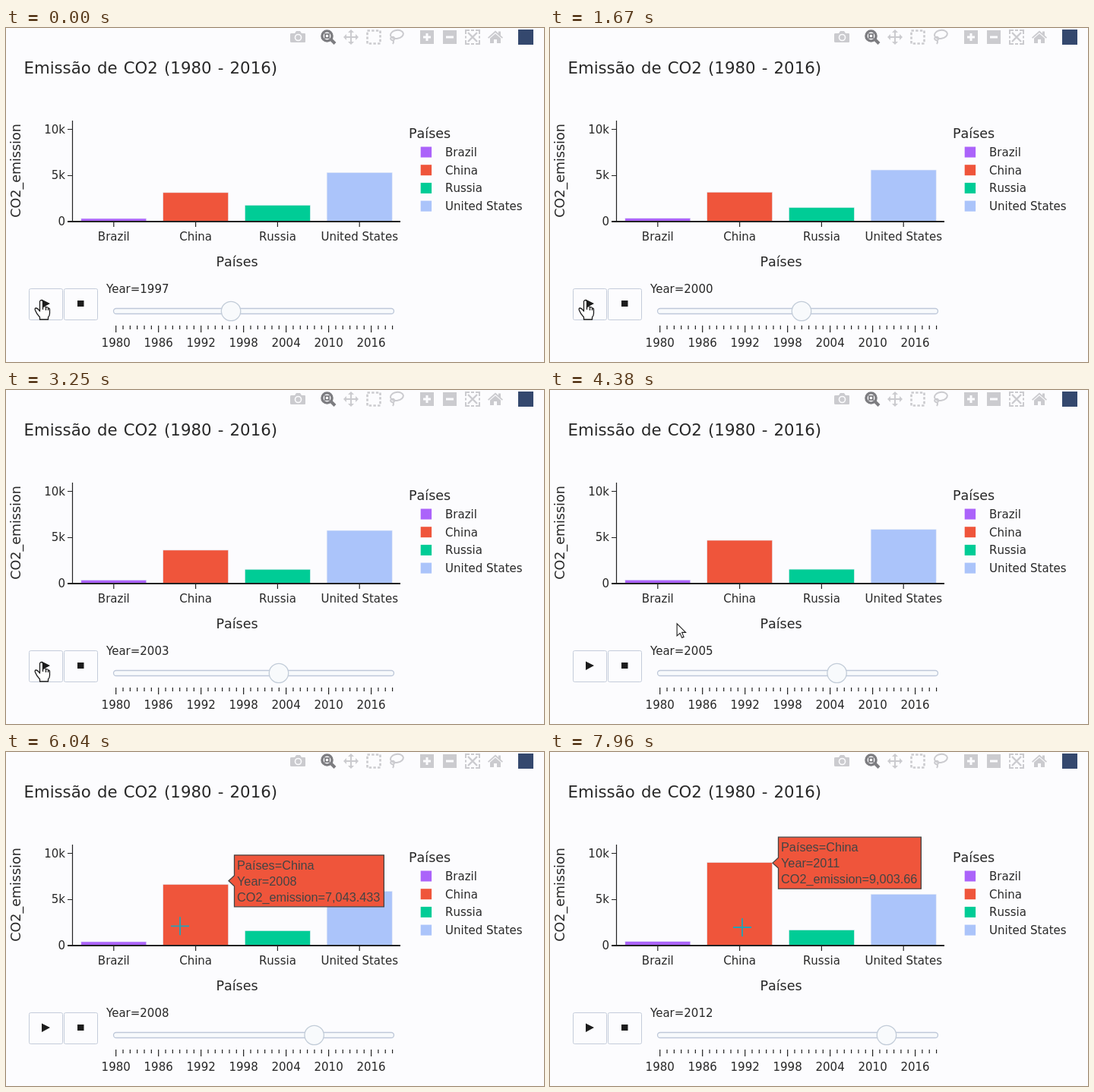
These frames come from a looping animation (708x440 px, 8000 ms). An HTML page:

```html
<!DOCTYPE html>
<html lang="pt">
<head>
<meta charset="utf-8">
<title>Emissão de CO2</title>
<style>
  html, body { margin: 0; width: 100%; height: 100%; overflow: hidden; background: #fcfcfe; }
  svg { display: block; }
  text { font: 15px "DejaVu Sans", sans-serif; font-kerning: none; fill: #282828; }
  .axis { font-size: 17.5px; }
  .title { font-size: 21.25px; word-spacing: .07em; }
  .mid { text-anchor: middle; }
  .end { text-anchor: end; }
  #year { font-kerning: normal; }
  #tip text { font: 16.25px "Liberation Sans", Arial, sans-serif; font-kerning: normal; fill: #444; }
  .line { fill: none; stroke: #222; }
  .button { fill: #fcfcfe; stroke: #c4ccda; }
  .icons { fill: #cbcbcf; }
  .icons .o { fill: none; stroke: #cbcbcf; }
  .icons .w { fill: none; stroke: #fcfcfe; stroke-width: 3; }
</style>
</head>
<body>
<svg width="708" height="440" viewBox="0 0 708 440">
  <g class="icons">
    <path d="M376 7h4l2-3h5l2 3h4q1 0 1 1v10q0 1-1 1h-17q-2 0-2-1v-10q0-1 2-1z"/>
    <circle cx="384.5" cy="12.5" r="4" class="w" style="stroke-width:1.6"/>
    <g fill="none" stroke="#7c7c80">
      <circle cx="422.5" cy="10.5" r="6.6" stroke-width="3.4"/>
      <path d="M428 15.5l5 5" stroke-width="4"/>
      <rect x="420" y="8" width="5" height="5" stroke-width="1.8"/>
    </g>
    <path class="o" stroke-width="2" d="M447 12h14M454 5v14"/>
    <path d="M444 12l4-4v8zM464 12l-4-4v8zM454 2l-4 4h8zM454 22l-4-4h8z"/>
    <rect class="o" x="475.5" y="3.5" width="17" height="17" stroke-width="2.6" stroke-dasharray="3.4 2.27"/>
    <g class="o" stroke-width="2">
      <ellipse cx="514.5" cy="8.5" rx="8.5" ry="5.5" transform="rotate(-10 514 9)"/>
      <path d="M507 12q-2 3 1 4t3-2t-3-2M509 16q2 2 0 5"/>
    </g>
    <path d="M545 3h18v18h-18zM575 3h18v18h-18z"/>
    <path class="w" d="M549 12h10M554 7v10M579 12h10"/>
    <path class="o" stroke-width="2.4" d="M608 6l12 12M620 6l-12 12"/>
    <path class="o" stroke-width="2" d="M605 8v-5h5M618 3h5v5M623 16v5h-5M610 21h-5v-5M612 3h4M612 21h4M605 10.5v3M623 10.5v3"/>
    <path d="M634 12.5L644 3.5l4 3.6V4.5h3v5.3l3 2.7-1.2 1.2L644 6l-8.8 7.7zM637 13.5l7-6 7 6v6.5h-5v-5h-4v5h-5z"/>
    <rect x="674" y="2" width="20" height="20" fill="#34486e"/>
  </g>

  <text class="title" x="23.5" y="60">Emissão de CO2 (1980 - 2016)</text>
  <text class="axis mid" transform="translate(19 188) rotate(-90)">CO2_emission</text>
  <text class="axis mid" x="304" y="314">Países</text>
  <text class="axis" x="530" y="145">Países</text>

  <g id="chart"></g>
  <path class="line" stroke-width="1.2" d="M87.5 122V255M81 194.5H87M81 133.5H87"/>
  <path class="line" stroke-width="2" d="M81 255H519"/>

  <g class="button">
    <rect x="30.5" y="343.5" width="44" height="41" rx="2"/>
    <rect x="76.5" y="343.5" width="44" height="41" rx="2"/>
  </g>
  <path fill="#1c1c1c" d="M47 357.5l11 5.500-11 6zM94 359h8.500v8h-8.500z"/>

  <text id="year" x="132" y="349"></text>
  <rect x="141.5" y="369.5" width="369" height="7" rx="3.5" fill="#f8fafc" stroke="#bec8d9" stroke-width="1.3"/>
  <g id="scale"></g>
  <circle id="handle" cy="373" r="12.7" fill="#f8fafc" stroke="#c2ccd8" stroke-width="1.3"/>

  <g id="tip">
    <path id="tipBox" fill="#ef553b" stroke="#444" stroke-width="1.3"/>
    <text x="304" y="-15">Países=China</text>
    <text id="tipYear" x="304" y="6"></text>
    <text id="tipValue" x="304" y="27"></text>
  </g>

  <g id="hand" fill="#fff" stroke="#1c1c1c" stroke-width="1.3" stroke-linejoin="round">
    <path d="M-2 1q2-3 4 0v8l1-1q2-1 3 1 2-1 3 1 2 0 2 2v5q0 3-2 5v3H-2v-3q-4-4-6-9-1-3 1-3t5 4z"/>
    <path fill="none" d="M2 8v4M6 9v4M9 10v3"/>
  </g>
  <path id="arrow" fill="#fff" stroke="#1c1c1c" stroke-width="1.1" d="M0 0V16L4 12.5 6.5 18.5 9 17.5 6.5 11.5H11.5z"/>
  <path id="cross" fill="none" stroke="#24a2b6" stroke-width="1.8" d="M-12 0H12M0-12V12"/>
</svg>

<script>
const LOOP = 8000, HOLD = 130, FIRST_YEAR = 1997;
const SLIDE = 150, GROW = 500, TIP_DELAY = 220;
const $ = id => document.getElementById(id);

// Key points of emission by year; values between them are interpolated.
const countries = [
  { name: "Brazil", fill: "#ab63fa", keys: [[1996, 275], [2011, 390]] },
  { name: "China", fill: "#ef553b", keys: [[1996, 3100], [1999, 3150], [2002, 3590], [2004, 4660],
    [2006, 6120.078], [2009, 7505.111], [2011, 9003.66]] },
  { name: "Russia", fill: "#00cc96", keys: [[1996, 1720], [1999, 1474], [2006, 1520], [2009, 1640]] },
  { name: "United States", fill: "#abc4fa", keys: [[1996, 5280], [1999, 5570], [2006, 5950], [2011, 5540]] }
];
const china = countries[1];

// Pointer: time, x, y.
const pointer = [[3800, 46.5, 359], [4380, 167, 308], [5000, 228, 232], [6960, 230, 227], [7960, 253, 231]];

const clamp = v => Math.max(0, Math.min(1, v));
const ease = v => v < .5 ? 4 * v ** 3 : 1 - 4 * (1 - v) ** 3;
const yOf = value => 254.3 - value * 60.4 / 5000;
const yearX = year => 144.4 + (year - 1980) * 9.33;

// A steady beat, held up a little while the pointer crosses the chart.
const startOf = k => 524 * k - 60 + 150 * Math.exp(-(((k - 9) / 2) ** 2));

function stepAt(t) {
  let k = -1;
  while (startOf(k + 1) <= t) k++;
  return k;
}

// Fractional year of a part that follows each step over the given span.
function yearAt(t, span) {
  const k = stepAt(t);
  return FIRST_YEAR - 1 + k + ease(clamp((t - startOf(k)) / span));
}

function interpolate(keys, at, column = 1) {
  const next = keys.findIndex(key => key[0] > at);
  if (next < 1) return keys.at(next)[column];
  const a = keys[next - 1], b = keys[next];
  return a[column] + (b[column] - a[column]) * (at - a[0]) / (b[0] - a[0]);
}

function add(parent, tag, attrs, text = "") {
  const node = document.createElementNS("http://www.w3.org/2000/svg", tag);
  for (const key in attrs) node.setAttribute(key, attrs[key]);
  node.textContent = text;
  return parent.appendChild(node);
}

const chart = $("chart"), scale = $("scale");
countries.forEach((country, i) => {
  const { name, fill } = country, x = 141.8 + i * 107.8, y = 163.5 + i * 23.7;
  add(chart, "text", { x, y: 280, class: "mid" }, name);
  add(chart, "path", { d: `M${x} 255v7`, class: "line", "stroke-width": 1.2 });
  add(chart, "rect", { x: 545.7, y: y - 7, width: 14.4, height: 14, fill });
  add(chart, "text", { x: 578, y: y + 5.3 }, name);
  country.bar = add(chart, "rect", { x: x - 43, width: 86, fill, stroke: "#e5ecf6", "stroke-width": .6 });
});
["0", "5k", "10k"].forEach((label, i) =>
  add(chart, "text", { x: 78, y: yOf(i * 5000) + 5.4, class: "end" }, label));

for (let year = 1980; year < 2020; year++) {
  const major = year % 6 === 0, x = yearX(year) + .3;
  add(scale, "path", { d: `M${x} 392v${major ? 9 : 5}`, class: "line", "stroke-width": 1.2 });
  if (major) add(scale, "text", { x, y: 420, class: "mid" }, year);
}

function drawPointer(t) {
  const x = interpolate(pointer, t, 1), y = interpolate(pointer, t, 2);
  const shape = x < 75 && y > 343 ? "hand" : x > 87 && y < 255 ? "cross" : "arrow";
  for (const id of ["hand", "arrow", "cross"]) $(id).style.display = id === shape ? "" : "none";
  $(shape).setAttribute("transform", `translate(${x} ${y})`);
  return shape;
}

function drawTip(t) {
  const year = FIRST_YEAR + stepAt(t), value = interpolate(china.keys, year);
  $("tipYear").textContent = "Year=" + year;
  $("tipValue").textContent = "CO2_emission=" + value.toLocaleString("en-US", { maximumFractionDigits: 3 });
  const right = 309 + $("tipValue").getComputedTextLength();
  $("tipBox").setAttribute("d", `M293 0L300.5-7V-34H${right}V34H300.5V7z`);
  $("tip").setAttribute("transform", `translate(0 ${yOf(value) + .6})`);
}

function draw(t) {
  const grown = yearAt(t - SLIDE, GROW);
  for (const { bar, keys } of countries) {
    const top = yOf(interpolate(keys, grown));
    bar.setAttribute("y", top);
    bar.setAttribute("height", 254.3 - top);
  }
  $("year").textContent = "Year=" + (FIRST_YEAR + stepAt(t));
  $("handle").setAttribute("cx", yearX(yearAt(t, SLIDE)));
  const hovering = drawPointer(t) === "cross";
  $("tip").style.display = hovering ? "" : "none";
  if (hovering) drawTip(t - TIP_DELAY);
}

const begin = performance.now();
function tick() {
  const t = (performance.now() - begin) % LOOP;
  draw(t < HOLD ? 0 : t);
  requestAnimationFrame(tick);
}
tick();
</script>
</body>
</html>
```
